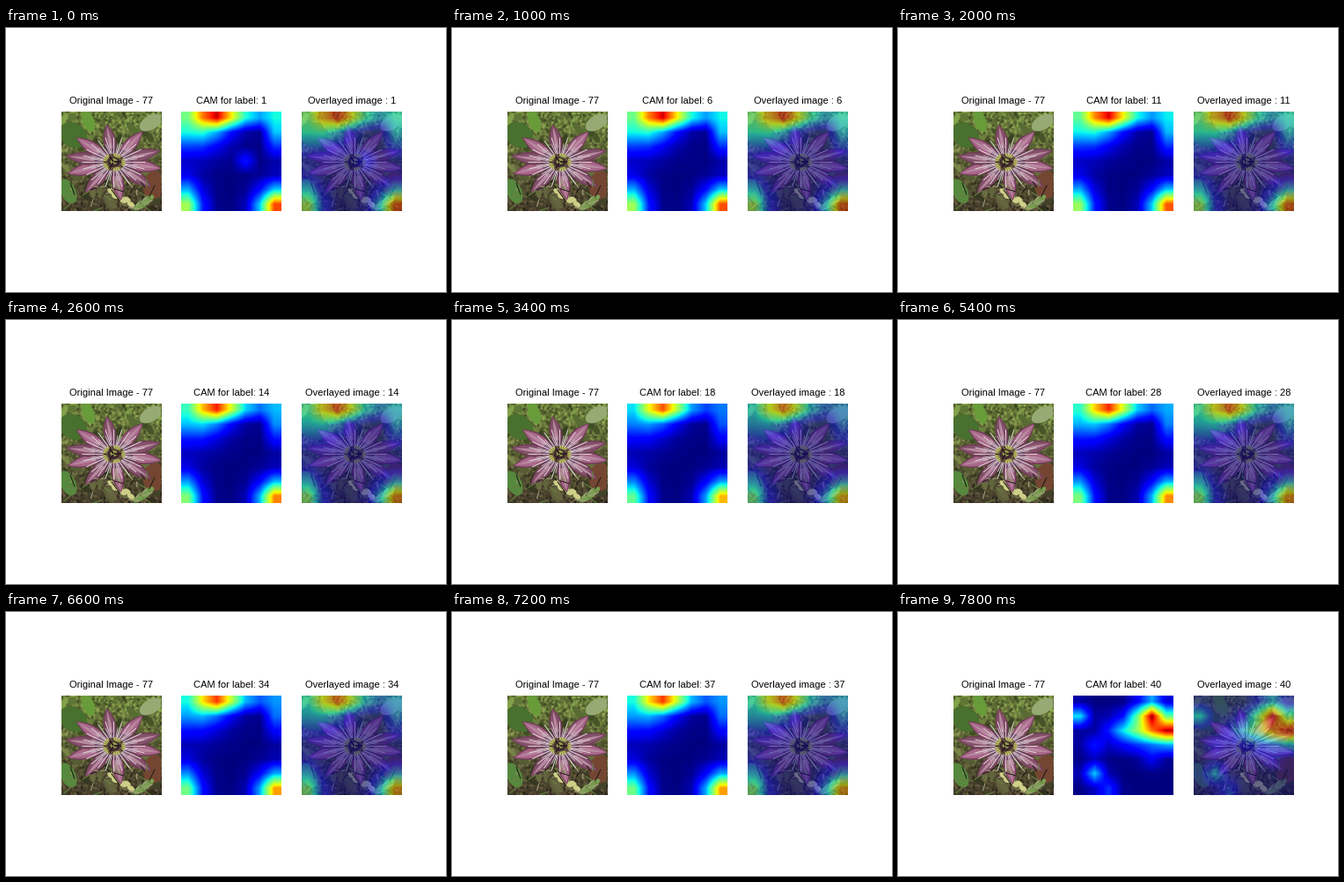
Recreate the animation shown at these times as a matplotlib script. Size 500 by 300 pixels, loop 8 s.

```python
import numpy as np
import matplotlib.pyplot as plt
from matplotlib.animation import FuncAnimation
from matplotlib.collections import LineCollection
from matplotlib.patches import Ellipse, Polygon

plt.rcParams["font.family"] = "Liberation Sans"
SIZE, CELLS = 114, 7
FRAMES, STEP = 40, 200
CENTER = np.array([60, 58])

cells = (np.arange(CELLS) + .5) / CELLS
pixels = (np.arange(SIZE) + .5) / SIZE
CX, CY = np.meshgrid(cells, cells)
SPREAD = np.array([np.interp(pixels, cells, row) for row in np.eye(CELLS)]).T


def spot(x, y, amp, rx, ry=None):
    return amp * np.exp(-((CX - x) / rx) ** 2 - ((CY - y) / (ry or rx)) ** 2)


def edge_grid(label):
    """Heat along the top edge and in the corners, stronger or weaker by label."""
    glow = np.interp(label, [1, 11, 18, 22, 28, 34],
                     [1.05, 1, .68, .96, .82, .76])
    soft = .6 + .4 * glow
    return (spot(.36, .07, .62, .20, .10)
            + glow * spot(.13, .12, .42, .30, .26)
            + glow * spot(.70, .05, .30, .30, .08)
            + glow * spot(.98, .20, .40, .10, .20)
            + soft * spot(0, 1, .68, .18, .26)
            + soft * spot(1, 1, 1.03, .21)
            + .5 ** (label - 1) * spot(.64, .50, .15, .07))


def ring_grid():
    """Heat on the upper right petals with faint spots around the flower."""
    hot = (spot(.78, .20, .72, .13) + spot(.93, .36, .85, .13)
           + spot(.70, .34, .50, .16) + spot(.46, .36, .28, .13))
    faint = (spot(.07, .21, .35, .09) + spot(.21, .79, .33, .10)
             + spot(.20, .50, .15, .10) + spot(.36, .95, .18, .09)
             + spot(.79, .63, .10, .10))
    return hot + faint


def cam(label):
    grid = edge_grid(label) if label < FRAMES else ring_grid()
    return np.clip(SPREAD @ grid @ SPREAD.T, 0, 1)


def rgb(*c):
    return np.clip(np.array(c) / 255, 0, 1)


def oval(ax, x, y, w, h, angle, color):
    ax.add_patch(Ellipse((x, y), w, h, angle=angle, fc=color, lw=0))


def rays(ax, count, inner, outer, color, width):
    a = np.linspace(0, 2 * np.pi, count, endpoint=False)
    way = np.stack([np.cos(a), .8 * np.sin(a)], 1)
    lines = np.stack([CENTER + inner * way, CENTER + outer * way], 1)
    ax.add_collection(LineCollection(lines, colors=[color], linewidths=width))


def petal(ax, axis, width, color):
    side = np.array([-axis[1], axis[0]]) / np.hypot(*axis)
    t = np.linspace(0, 1, 24)
    mid = CENTER + np.outer(t, axis)
    edge = np.outer(width * np.sin(np.pi * t ** 1.2), side)
    ax.add_patch(Polygon(np.vstack([mid + edge, (mid - edge)[::-1]]),
                         fc=color, lw=0))


def foliage(ax):
    """Sunny leaves above, dark soil with twigs below."""
    rng = np.random.RandomState(8)
    ax.set_facecolor(rgb(74, 80, 44))
    y = np.linspace(0, 1, 57)[:, None, None]
    ground = rgb(104, 124, 58) * (1 - y) + rgb(74, 64, 46) * y
    noise = 1 + .28 * rng.randn(57, 57, 1)
    ax.imshow(np.clip(ground * noise, 0, 1), extent=(0, SIZE, SIZE, 0),
              interpolation="bilinear")
    for _ in range(46):
        x, y = rng.uniform(0, SIZE, 2)
        low = y / SIZE
        tone = rgb(118, 150, 66) * (1 - low) + rgb(92, 88, 58) * low
        oval(ax, x, y, rng.uniform(10, 24), rng.uniform(4, 9),
             rng.uniform(0, 180), np.clip(tone * rng.uniform(.5, 1.25), 0, 1))
    oval(ax, 14, 27, 34, 27, 35, rgb(72, 112, 46))
    oval(ax, 31, 11, 13, 26, -20, rgb(104, 156, 58))
    oval(ax, 102, 13, 28, 16, -30, rgb(152, 170, 116))
    oval(ax, 8, 91, 17, 30, -25, rgb(86, 136, 62))
    oval(ax, 106, 84, 26, 32, 10, rgb(116, 70, 50))
    oval(ax, 94, 104, 28, 9, -35, rgb(120, 158, 80))
    start = rng.uniform((0, 82), (SIZE, SIZE), (36, 2))
    twigs = np.stack([start, start + rng.uniform(-14, 14, (36, 2))], 1)
    tones = [rgb(168, 158, 130), rgb(36, 30, 22), rgb(104, 128, 64)]
    ax.add_collection(LineCollection(twigs, colors=tones, linewidths=.8))
    for k in range(6):
        oval(ax, 57 + 4.5 * k, 91 + 2.4 * k + 3 * (k % 2), 9, 6, 30,
             rgb(206, 206, 136))


def flower(ax):
    for k in range(10):
        a = np.radians(12 + 36 * k + 8 * np.cos(.4 * np.pi * (k - 3.5)))
        axis = np.array([56 * np.cos(a), 44 * np.sin(a)])
        petal(ax, axis, 7.2, rgb(112, 62, 86))
        petal(ax, .97 * axis, 5.6, rgb(150, 92, 122) * (1 + .12 * (-1) ** k))
        petal(ax, .92 * axis, 1.8, rgb(184, 136, 160))
    oval(ax, *CENTER, 44, 32, 0, (*rgb(100, 62, 88), .75))
    rays(ax, 24, 12, 36, rgb(224, 214, 216), .7)
    rays(ax, 36, 12, 27, rgb(206, 190, 202), .6)
    oval(ax, *CENTER, 25, 19, 0, rgb(64, 42, 46))
    rays(ax, 27, 7, 13, rgb(134, 122, 74), .6)
    for k in range(5):
        a = np.radians(72 * k - 70)
        oval(ax, 60 + 11 * np.cos(a), 58 + 8 * np.sin(a), 9, 4.5,
             72 * k + 20, rgb(190, 200, 96))
    oval(ax, 60, 57, 8, 7, 0, rgb(146, 154, 74))
    rays(ax, 3, 1, 9, rgb(46, 26, 34), 1.3)


fig, axes = plt.subplots(1, 3, figsize=(5, 3), dpi=100)
plain, heat_ax, mixed = axes
for ax in (plain, mixed):
    foliage(ax)
    flower(ax)
style = dict(cmap="jet", vmin=0, vmax=1, extent=(0, SIZE, SIZE, 0))
heat = heat_ax.imshow(cam(1), **style)
cover = mixed.imshow(cam(1), alpha=.5, zorder=5, **style)
for ax in axes:
    ax.set(xlim=(0, SIZE), ylim=(SIZE, 0), aspect="equal")
    ax.axis("off")
plain.set_title("Original Image - 77", fontsize=8)


def update(i):
    label = i + 1
    data = cam(label)
    heat.set_data(data)
    cover.set_data(data)
    heat_ax.set_title(f"CAM for label: {label}", fontsize=8)
    mixed.set_title(f"Overlayed image : {label}", fontsize=8)
    return heat, cover


anim = FuncAnimation(fig, update, frames=FRAMES, interval=STEP,
                     repeat=True, repeat_delay=0, blit=False)
plt.show()
```
